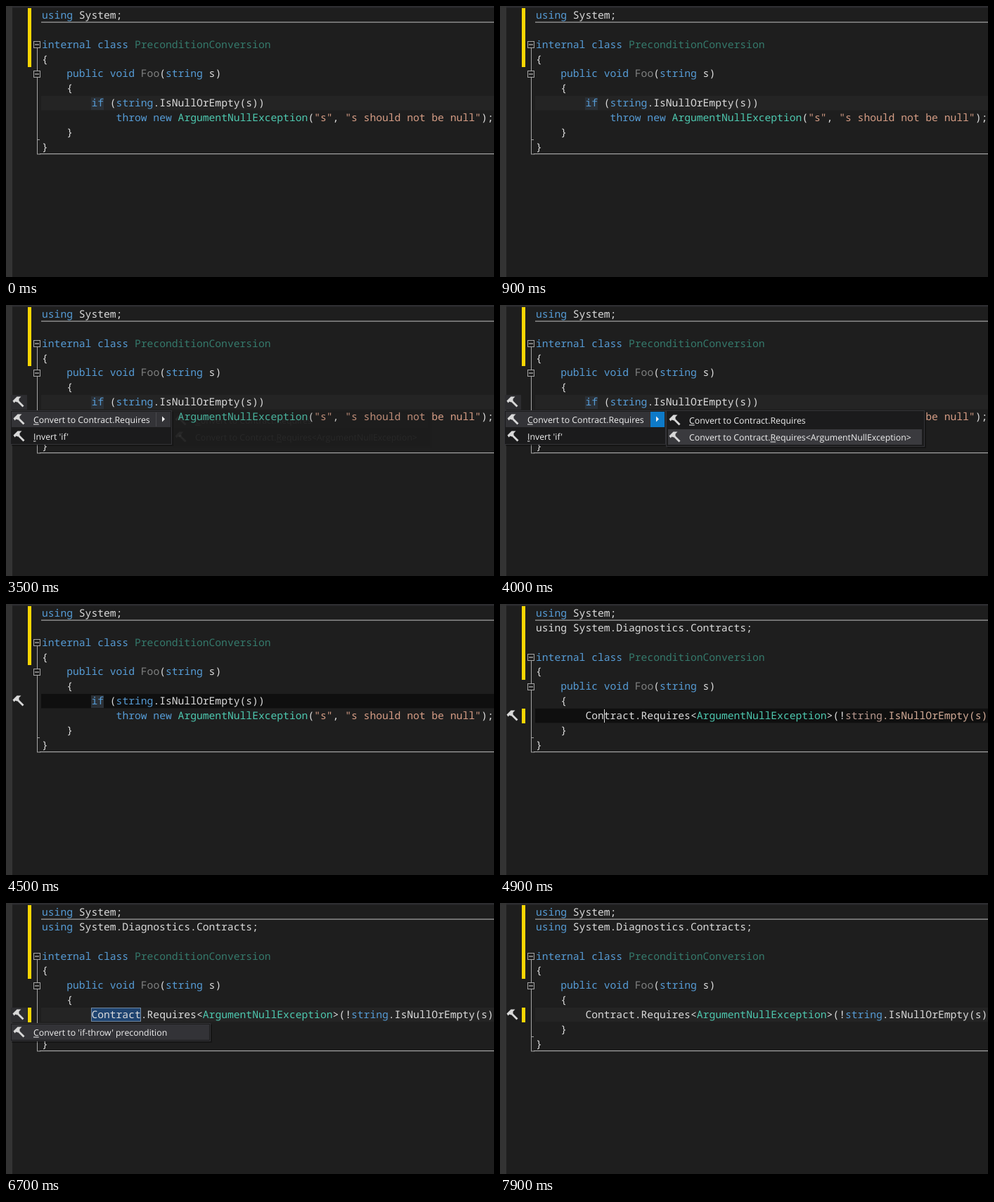
These frames come from a looping animation (694 px wide and 386 px high, 8 s). An HTML page with a canvas:

```html
<!DOCTYPE html>
<html lang="en">
<head>
<meta charset="utf-8">
<title>Precondition conversion</title>
<style>
  html, body { margin: 0; width: 100%; height: 100%; overflow: hidden; background: #1e1e1e; }
  canvas { display: block; }
</style>
</head>
<body>
<canvas id="stage" width="694" height="386"></canvas>
<script>
const ctx = document.getElementById('stage').getContext('2d');
const W = 694, H = 386, LOOP = 8000, STEP = 100;
const CODE_FONT = '14.67px "Noto Sans Mono", monospace';
const MENU_FONT = '12.3px "Open Sans", sans-serif';
const LEFT = 51, COL = 8.8, ROW = 20.85, BASE = 18;
const PLAIN = '#dcdcdc', KEY = '#569cd6', TYPE = '#4ec9b0', STR = '#d69d85',
      DIM = '#7f8080', UNUSED = '#357a6c', RULE = '#a5a5a5', YELLOW = '#fbd603';

const between = (t, a, b) => t >= a && t < b;
const colX = c => LEFT + c * COL;
const rowTop = r => BASE - 15 + r * ROW;

function box(x, y, w, h, fill, stroke) {
  ctx.fillStyle = fill;
  ctx.fillRect(x, y, w, h);
  if (!stroke) return;
  ctx.strokeStyle = stroke;
  ctx.lineWidth = 1;
  ctx.strokeRect(x + 0.5, y + 0.5, w - 1, h - 1);
}

// Draws alternating text, colour pairs on the character grid.
function code(row, col, ...parts) {
  ctx.font = CODE_FONT;
  for (let i = 0; i < parts.length; i += 2) {
    ctx.fillStyle = parts[i + 1];
    ctx.fillText(parts[i], colX(col), BASE + row * ROW);
    col += parts[i].length;
  }
}

function hammer(x, y) {
  ctx.save();
  ctx.translate(x, y);
  ctx.strokeStyle = ctx.fillStyle = '#d8d8d8';
  ctx.lineWidth = 2.8;
  ctx.beginPath();
  ctx.moveTo(-2, -2);
  ctx.lineTo(7, 7);
  ctx.stroke();
  ctx.beginPath();
  ctx.moveTo(-8, -1);
  ctx.lineTo(-2, -7);
  ctx.lineTo(4, -7);
  ctx.lineTo(1, -4);
  ctx.lineTo(1, -1);
  ctx.lineTo(-2, 1);
  ctx.lineTo(-4, 0);
  ctx.lineTo(-6, 2);
  ctx.fill();
  ctx.restore();
}

function item(x, y, text, mnemonic) {
  hammer(x - 20.5, y - 5);
  ctx.font = MENU_FONT;
  ctx.fillStyle = '#f1f1f1';
  ctx.fillText(text, x, y);
  const start = ctx.measureText(text.slice(0, mnemonic)).width;
  const width = ctx.measureText(text[mnemonic]).width;
  ctx.fillRect(x + start, y + 2, width, 1);
}

function arrow(x, y) {
  ctx.fillStyle = '#f1f1f1';
  ctx.beginPath();
  ctx.moveTo(x, y - 4);
  ctx.lineTo(x + 4, y);
  ctx.lineTo(x, y + 4);
  ctx.fill();
}

// Popups fade in over three steps.
function popup(t, open, close, draw) {
  if (!between(t, open, close)) return;
  ctx.globalAlpha = [0.06, 0.6][(t - open) / STEP] || 1;
  draw();
  ctx.globalAlpha = 1;
}

function panel(x, y, w, h) {
  box(x + 2, y + 2, w, h, 'rgba(0,0,0,.3)');
  box(x, y, w, h, '#1b1b1c', '#333337');
}

function mainMenu(t) {
  panel(6, 150, 230, 49);
  box(8, 152, 226, 22, '#333337');
  if (t >= 3700) box(214, 152, 20, 22, '#0e7ac8');
  else box(213, 153, 1, 20, '#4a4a4d');
  arrow(222, 162.5);
  item(39, 167.5, 'Convert to Contract.Requires', 0);
  item(39, 191.5, "Invert 'if'", 0);
}

function subMenu(t) {
  panel(236, 150, 368, 52);
  box(239, t < 3900 ? 153 : 177, 361, 22, '#3a3a3e');
  item(269, 168.5, 'Convert to Contract.Requires', 0);
  item(269, 192.5, 'Convert to Contract.Requires<ArgumentNullException>', 20);
}

function lastMenu() {
  panel(6, 171, 285, 26);
  box(8, 173, 281, 22, '#333337');
  item(39, 188.5, "Convert to 'if-throw' precondition", 0);
}

function outline(y1, y2) {
  ctx.fillStyle = RULE;
  ctx.fillRect(50, 22.5, W - 50, 1.2);
  ctx.fillRect(48, 210, W - 48, 1.2);
  ctx.fillRect(44, y1, 1, 211 - y1);
  ctx.fillRect(44, 190, 4, 1);
  ctx.fillRect(44, 210.5, 5, 1);
  for (const y of [y1, y2]) {
    box(39, y - 5, 10, 10, '#1e1e1e', RULE);
    box(41, y - 0.5, 6, 1, '#dcdcdc');
  }
}

function method(row) {
  code(row, 0, 'internal class ', KEY, 'PreconditionConversion', UNUSED);
  code(row + 1, 0, '{', PLAIN);
  code(row + 2, 4, 'public void ', KEY, 'Foo', DIM, '(', PLAIN, 'string', KEY, ' s)', PLAIN);
  code(row + 3, 4, '{', PLAIN);
  code(8, 4, '}', PLAIN);
  code(9, 0, '}', PLAIN);
}

function before(t) {
  box(31, 3, 5, 84, YELLOW);
  outline(55, 97);
  box(121, rowTop(6) + 2, 18, 18, '#2b3036');
  method(2);
  code(6, 8, 'if', KEY, ' (', PLAIN, 'string', KEY, '.IsNullOrEmpty(s))', PLAIN);
  code(7, 12, 'throw new ', KEY, 'ArgumentNullException', TYPE, '(', PLAIN, '"s"', STR,
    ', ', PLAIN, '"s should not be null"', STR, ');', PLAIN);
}

function after(t) {
  const fresh = t < 5400;
  box(31, 3, 5, 105, YELLOW);
  box(31, 149, 5, 21, YELLOW);
  outline(76, 118);
  if (between(t, 6100, 7600)) box(121, 149, 71, 20, '#1f4470', '#7189a3');
  code(1, 0, 'using', fresh ? PLAIN : KEY, ' System.Diagnostics.Contracts;', PLAIN);
  method(3);
  code(7, 8, 'Contract.Requires<', PLAIN, 'ArgumentNullException', TYPE, '>(!', PLAIN,
    'string', fresh ? '#b99a90' : KEY, '.IsNullOrEmpty(s)', fresh ? '#d5ad99' : PLAIN);
}

function caret(row, col) {
  box(Math.round(colX(col)), rowTop(row) + 1, 1, 19, PLAIN);
}

function draw(t) {
  const converted = t >= 4600;
  const row = converted ? 7 : 6;
  const focused = between(t, 2100, 2800) || between(t, 4500, 6300);
  const menuOpen = between(t, 2800, 4500) || between(t, 6400, 7600);

  box(0, 0, W, H, '#1e1e1e');
  box(0, 0, W, 2.5, '#2d2d30');
  box(0, 0, 9, H, '#333333');
  box(50, rowTop(row), W - 50, ROW - 0.5, focused ? '#0f0f0f' : '#242424');
  code(0, 0, 'using', KEY, ' System;', PLAIN);
  (converted ? after : before)(t);

  if (between(t, 2100, 2600)) caret(6, 8);
  if (between(t, 4800, 5400) || between(t, 5900, 6100)) caret(7, 11);
  if (t >= 2500) {
    if (menuOpen) box(7, rowTop(row), 23, 21, '#2d2d30');
    hammer(17.5, rowTop(row) + 9.5);
  }

  popup(t, 2600, 4500, () => mainMenu(t));
  popup(t, 3500, 4500, () => subMenu(t));
  popup(t, 6200, 7600, lastMenu);
}

ctx.textRendering = 'geometricPrecision';
const start = performance.now();
function tick() {
  const t = (performance.now() - start) % LOOP;
  draw(Math.floor(t / STEP) * STEP);
  requestAnimationFrame(tick);
}
tick();
</script>
</body>
</html>
```
